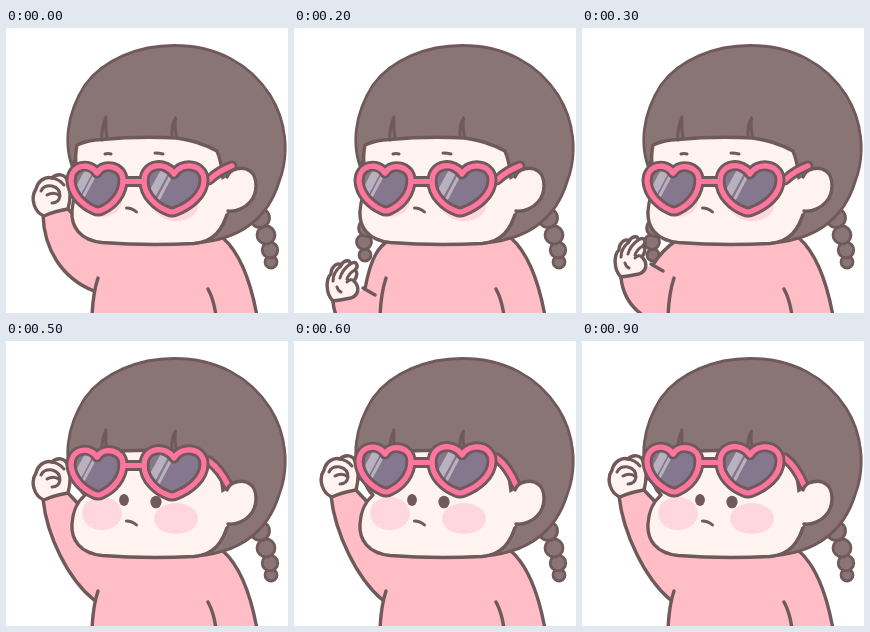
Recreate the animation shown at these times as an HTML page. Size 282 px wide and 285 px high, loop 1 s.

```html
<!DOCTYPE html>
<html lang="en">
<head>
<meta charset="utf-8">
<title>Heart sunglasses</title>
<style>
html, body { margin: 0; width: 100%; height: 100%; overflow: hidden; background: #fff; }
svg { display: block; width: 100vw; height: 100vh; }
.line { fill: none; }
.hair { fill: #8a7576; }
.skin { fill: #fef3ee; }
.cloth { fill: #ffbdc6; }
.fill { stroke: none; }
.rim { fill: none; stroke: #70595b; stroke-width: 11; }
.pink { fill: none; stroke: #ff759f; stroke-width: 5.2; }
</style>
</head>
<body>
<svg viewBox="0 0 282 285" stroke="#70595b" stroke-width="3.4" stroke-linecap="round" stroke-linejoin="round">
  <defs>
    <path id="heartL" d="M91 145C84 134 65 136 65 153C66 167 77 177 88 182Q92 184 96 182C107 177 117 166 117 152C117 138 98 134 91 145Z"/>
    <path id="heartR" d="M168 146C160 133 138 135 138 153C138 168 151 179 162 183Q166 185 170 183C183 178 198 167 198 152C198 136 176 133 168 146Z"/>
    <clipPath id="lenses"><use href="#heartL"/><use href="#heartR"/></clipPath>
  </defs>

  <g id="braidL" class="hair" stroke-width="2.800"></g>

  <path id="chest" class="cloth fill"/>
  <path id="sleeve" class="cloth fill"/>
  <path id="sleeveLine" class="line"/>
  <path class="line" d="M217 210C235 226 245 255 251 288M92 250Q87 265 86 288M202 261Q208 272 210 288"/>

  <g id="braidR" class="hair" stroke-width="2.800"></g>
  <path class="hair" stroke-width="2.800" d="M66 138C59 118 59 88 79 57C97 32 132 17.500 168 17.500C211 17.500 244 36 264 67C280 92 284 126 273 154C263 186 240 211 190 215V150L72 125Z"/>

  <path class="skin" d="M71 117Q82 112 96 111.500Q132 108 171 110Q193 113 211 123Q215 132 217 150L222 183C217 201 208 214 188 215.500Q140 218 96 214.500C74 212 65 199 66 183C67 169 71 161 79 154Q66 142 71 117Z"/>
  <path class="line" stroke-width="3" d="M100 89Q95 100 96 112M100 89Q99 100 101 110M169.500 90Q165 98 166 108M169.500 90Q168 100 171 110"/>
  <path class="line" stroke-width="3" d="M99 126Q102 125 105 126M149 125Q153 125 157 126"/>
  <g class="fill" fill="#ffd7dd">
    <ellipse cx="96" cy="172.500" rx="20" ry="16.500"/>
    <ellipse cx="170" cy="177.500" rx="22" ry="15.500"/>
  </g>
  <g id="eyes">
    <ellipse id="eyeL" class="fill" fill="#70595b" cx="118" cy="159" rx="4.900" ry="6"/>
    <ellipse id="eyeR" class="fill" fill="#70595b" cx="150" cy="161" rx="5.600" ry="6.300"/>
    <path id="wink" class="line" d="M142 163Q150 156 160 163"/>
  </g>
  <path id="mouth" class="line" stroke-width="3"/>

  <g id="fist" class="skin">
    <path d="M38 188C28 184 24 170 30 161C32 153 39 148 46 150C51 145 59 146 61 152C65 158 65 170 62 181Q49 183 38 188Z"/>
    <path class="line" stroke-width="3" d="M35 163Q38 157 46 158Q54 160 54 168M41 167Q48 163 54 168Q53 175 46 175M46 150Q53 151 58 157"/>
  </g>
  <g id="palm" class="skin">
    <path d="M39 249C31 241 32 226 37 222C37 215 43 210 47 213C51 207 57 208 56 212C63 208 65 214 61 218C65 221 62 226 60 229C66 235 65 243 57 246Q47 248 39 249Z"/>
    <path class="line" stroke-width="3" d="M39 229Q39 220 47 214M46 226Q48 218 56 212M53 227Q55 221 61 218M53 230Q57 226 60 229M43 235Q44 239 47 240"/>
  </g>

  <path class="rim" id="templeRim"/>
  <path class="pink" id="templePink"/>
  <path class="skin fill" d="M208 156L221 149L232 150L230 180L222 184L206 196Z"/>
  <path class="skin" d="M221 149C224 140 237 138 244 143C252 149 252 165 244 174C239 180 230 184 222 183"/>

  <g id="glasses">
    <g class="fill" fill="#85788e"><use href="#heartL"/><use href="#heartR"/></g>
    <g class="line" clip-path="url(#lenses)" stroke="#b9b2be" stroke-linecap="butt">
      <path stroke-width="8" d="M86 137L68 171M162 137L143 172"/>
      <path stroke-width="3" d="M93 139L75 173M169 140L150 176"/>
    </g>
    <g class="rim"><path d="M117 153.500H138"/><use href="#heartL"/><use href="#heartR"/></g>
    <g class="pink"><path d="M117 153.500H138"/><use href="#heartL"/><use href="#heartR"/></g>
  </g>
</svg>
<script>
const $ = id => document.getElementById(id);
const show = (id, on) => { $(id).style.display = on ? "" : "none"; };
const set = (id, name, value) => $(id).setAttribute(name, value);
const move = (id, y) => set(id, "transform", `translate(0 ${y})`);

// Each bead is [x, y, radius], lowest first.
function braid(id, beads) {
  $(id).innerHTML = beads.map(([x, y, r]) => `<circle cx="${x}" cy="${y}" r="${r}"/>`).join("");
}
braid("braidL", [[71, 227, 6], [70, 214, 7.5], [73, 200, 8.5]]);
braid("braidR", [[265, 234, 6], [264, 222, 7.8], [260, 207, 9], [254, 190, 9.5]]);

const SHOULDER = "M95 212C80 228 72 250 66 288";
const REST = "L251 288C245 255 235 226 217 210L95 212Z";

function bentArm(dy) {
  const outer = `M37 ${187 + dy}C${38 - dy * .1} ${220 + dy * .85} ${55 - dy * .25} ${250 + dy * .4} 88 ${263 + dy * .14}`;
  return {
    line: `${outer}M62 ${181 + dy}L78 ${198 + dy}`,
    fill: `${outer}L130 260V212L78 ${198 + dy}L62 ${181 + dy}Z`
  };
}

function wavingArm(dy) {
  const y = n => n + dy;
  const outer = `M39 ${y(250)}C41 ${y(268)} 50 ${y(280)} 62 ${y(288)}`;
  const shoulder = `C86 218 77 227 71 ${y(237)}`;
  return {
    line: `${outer}M69 ${y(236)}L81 ${y(243)}M95 212${shoulder}`,
    fill: `${outer}L130 288V212H95${shoulder}Z`
  };
}

// Steps of 100 ms; the last pose holds until the loop restarts.
const POSES = [
  { arm: "bent", dy: 0 },
  { arm: "down", dy: 0 },
  { arm: "wave", dy: 24 },
  { arm: "wave", dy: 0 },
  { arm: "bent", dy: 0 },
  { arm: "bent", dy: -29, up: true },
  { arm: "bent", dy: -32, up: true }
];

function drawArm({ arm, dy }) {
  const shape = arm === "bent" ? bentArm(dy)
    : arm === "wave" ? wavingArm(dy)
    : { line: SHOULDER, fill: SHOULDER + REST };
  set("sleeve", "d", shape.fill);
  set("sleeveLine", "d", shape.line);
  show("fist", arm === "bent");
  show("palm", arm === "wave");
  move("fist", dy);
  move("palm", dy);
}

function drawGlasses({ up, dy }) {
  const y = up ? dy : 0;
  const temple = up ? `M203 ${149 + y}Q214 ${157 + y} 222 144` : "M203 152Q214 142 226 138";
  set("templeRim", "d", temple);
  set("templePink", "d", temple);
  move("glasses", y);
}

function drawFace(up, t) {
  const half = t >= 700 && t < 900;
  const closed = t >= 767 && t < 833;
  show("eyes", up);
  show("eyeR", !closed);
  show("wink", closed);
  set("eyeR", "ry", half ? 3 : 6.3);
  set("mouth", "d", closed ? "M120 181Q127 188 133 181"
    : half ? "M120 181Q127 183 132 183"
    : "M120.500 180Q126 180 130.500 184");
}

function render(t) {
  const pose = POSES[Math.min(Math.floor(t / 100), POSES.length - 1)];
  drawArm(pose);
  drawGlasses(pose);
  drawFace(!!pose.up, t);
}

set("chest", "d", "M95 212L92 250Q87 265 86 288" + REST);
const start = performance.now();
function tick() {
  render((performance.now() - start) % 1000);
  requestAnimationFrame(tick);
}
tick();
</script>
</body>
</html>
```
